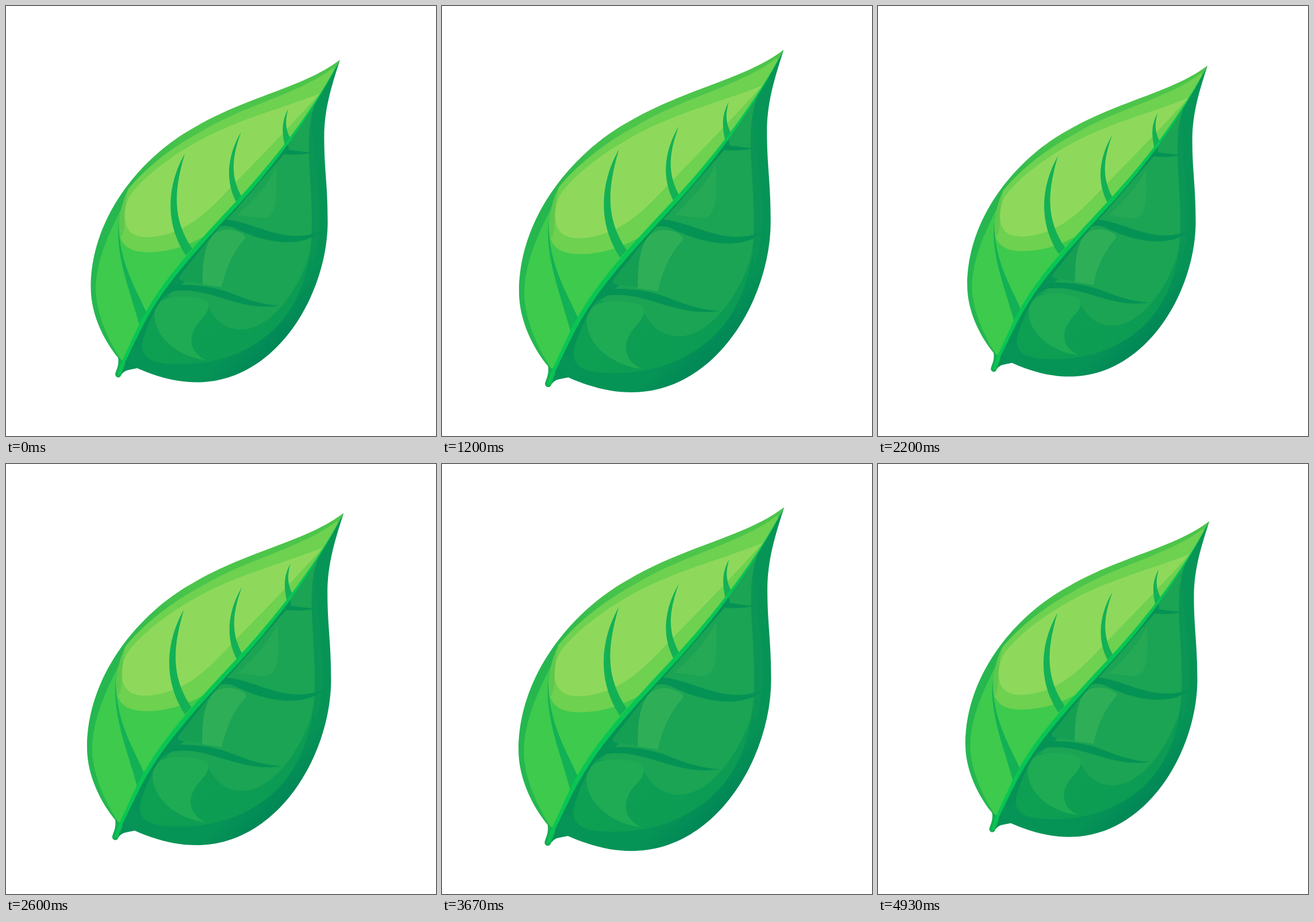
An HTML page for the animation above (4.99 s loop, 748 by 748 pixels).

```html
<!DOCTYPE html>
<html lang="en">
<head>
<meta charset="utf-8">
<title>Pulsing leaf</title>
<style>
  html, body { margin: 0; width: 100%; height: 100%; overflow: hidden; background: #fff; }
  svg { display: block; width: 100vw; height: 100vh; }
</style>
</head>
<body>
<svg viewBox="0 0 748 748">
  <defs>
    <linearGradient id="rim" gradientUnits="userSpaceOnUse" x1="170" y1="500" x2="330" y2="220">
      <stop offset="0" stop-color="#25b750"/>
      <stop offset=".5" stop-color="#27b74f"/>
      <stop offset="1" stop-color="#4cc54a"/>
    </linearGradient>
    <linearGradient id="shade" gradientUnits="userSpaceOnUse" x1="370" y1="440" x2="500" y2="570">
      <stop offset="0" stop-color="#069556"/>
      <stop offset=".7" stop-color="#069356"/>
      <stop offset="1" stop-color="#008657"/>
    </linearGradient>
    <linearGradient id="belly" gradientUnits="userSpaceOnUse" x1="300" y1="520" x2="450" y2="600">
      <stop offset="0" stop-color="#0d9f52"/>
      <stop offset="1" stop-color="#0c9b53"/>
    </linearGradient>
    <clipPath id="leftHalf">
      <path d="M581 93.5C520 141 420 157 328 211C235 262 147.5 368 147.5 490C147.5 535 169 580 195 612L202 625C212 604 222 582 235 555C272 482 333 418 402 343C481 257 541 169 581 93.5Z"/>
    </clipPath>
    <clipPath id="rightHalf">
      <path d="M581 93.5C541 169 481 257 402 343C333 418 272 482 235 555C222 582 212 604 202 625L204 635L228 630C262 645 296 654.6 332 654.6C471 654.6 559.6 500 559.6 375C559.6 310 553.5 285 553.5 228C553.5 180 566 140 581 93.5Z"/>
    </clipPath>
  </defs>

  <g id="leaf">
    <g clip-path="url(#leftHalf)">
      <rect x="140" y="90" width="450" height="550" fill="url(#rim)"/>
      <path fill="#3dca4d" d="M572 108C520 150 420 175 335 226C285 255 235 300 206 342C178 395 156 445 156 495C158 540 180 585 200 615L230 620L580 220Z"/>
      <path fill="#6ed150" d="M570 107C510 153 415 172 340 218C285 247 240 285 213 318C200 343 193 385 199 403C206 424 228 430 258 428C300 425 335 409 365 388L580 180Z"/>
      <path fill="#58c54d" opacity=".7" d="M213 318C200 343 195 370 196 398C202 410 207 390 206 366C207 345 210 330 213 318Z"/>
      <path fill="#8ed95c" d="M546 152C482 178 410 195 340 232C284 262 235 301 215 331C206 348 205 369 209 381C215 399 232 403 252 402C322 396 362 345 398 308C448 257 500 203 546 152Z"/>
      <g fill="#13b155">
        <path d="M196 373C190 433 213 487 232 555L245 535C225 489 195 444 196 373Z"/>
        <path d="M311 257C284 304 272 372 313 434L324 422C289 370 292 322 311 257Z"/>
        <path d="M409 219C390 251 377 297 401 342L410 332C388 293 395 258 409 219Z"/>
        <path d="M491 179C479 201 480 218 485 242L495 231C485 212 486 197 491 179Z"/>
      </g>
    </g>

    <g clip-path="url(#rightHalf)">
      <rect x="190" y="90" width="400" height="570" fill="url(#shade)"/>
      <path fill="#0b9656" d="M580 94L530 175L538 270C550 350 548 405 533 445L527 420L520 190Z"/>
      <path fill="url(#belly)" d="M272 507C251 538 238 569 237 593C238 616 261 623 300 623C363 624 416 605 458 570C497 537 526 483 533 400L400 440Z"/>
      <path fill="#1aa453" d="M546 152L493 235L390 363L374 382L302 468C299 475 304 478 312 479L280 505L350 520C363 548 383 563 410 563C461 562 508 494 526 438C540 380 525 285 527 235C527 203 534 174 546 152Z"/>
      <path fill="#1fab54" d="M268 515C280 502 326 503 346 512C359 519 350 535 339 546C314 573 318 602 348 616C303 611 265 581 259 547C257 532 260 522 268 515Z"/>
      <path fill="#149f53" d="M352 401L302 469C299 476 306 479 314 479L342 482Z"/>
      <path fill="#2eaf57" d="M356 404C366 387 392 384 412 397C417 400 418 403 413 408C392 432 381 461 375 489L342 484C342 454 343 426 356 404Z"/>
      <path fill="#25a955" d="M470 280C471 311 472 333 467 350C463 365 456 370 443 369L402 364C433 336 457 309 470 280Z"/>
      <g fill="#059255">
        <path d="M490 238L390 353L290 468L220 595L233 596C246 555 258 524 280 498L365 390L393 362L492 248Z"/>
        <path d="M470 247C492 250 509 253 532 255C511 260 493 259 470 256Z"/>
        <path d="M365 371C427 367 479 422 551 390C503 432 424 400 395 385C383 381 373 381 355 391Z"/>
        <path d="M268 490C300 481 350 484 390 499C420 511 446 520 476 521C411 532 362 494 307 495C289 495 273 500 260 507Z"/>
      </g>
    </g>

    <path fill="#079158" d="M201 622L208 615L228 630C213 631 205 635 201 641Z"/>
    <path fill="#16ad54" d="M195 611C197 626 192 632 190 640C190 647 198 648 200 643L208 622Z"/>
    <path fill="#08c653" d="M581 93.5C541 168 480 254 400 340C330 415 268 480 232 553C219 581 209 602 200 622L194 641L198 642L206 622C214 605 225 582 238 556C275 484 336 420 405 345C483 260 542 170 581 93.5Z"/>
  </g>
</svg>
<script>
  const LOOP = 4990, FRAMES = 75, STEP = LOOP / FRAMES;
  const BEAT = 1120, RISE = 1 / 3;
  const LOW = 0.85, SWING = 0.3;
  const CX = 364.5, CY = 374;
  const leaf = document.getElementById('leaf');

  // Each beat grows at constant speed, then shrinks with a quadratic ease-out.
  function scaleAt(time) {
    const phase = (time / BEAT + RISE / 2) % 1;
    const level = phase < RISE
      ? phase / RISE
      : (1 - (phase - RISE) / (1 - RISE)) ** 2;
    return LOW + SWING * level;
  }

  function render(elapsed) {
    // Holds switch on whole hundredths of a second.
    const frame = Math.min(FRAMES - 1, Math.floor((elapsed % LOOP + 5) / STEP));
    const s = scaleAt(frame * STEP);
    leaf.setAttribute('transform',
      `translate(${CX} ${CY}) scale(${s}) translate(${-CX} ${-CY})`);
  }

  const start = performance.now();
  function tick() {
    render(performance.now() - start);
    requestAnimationFrame(tick);
  }
  tick();
</script>
</body>
</html>
```
